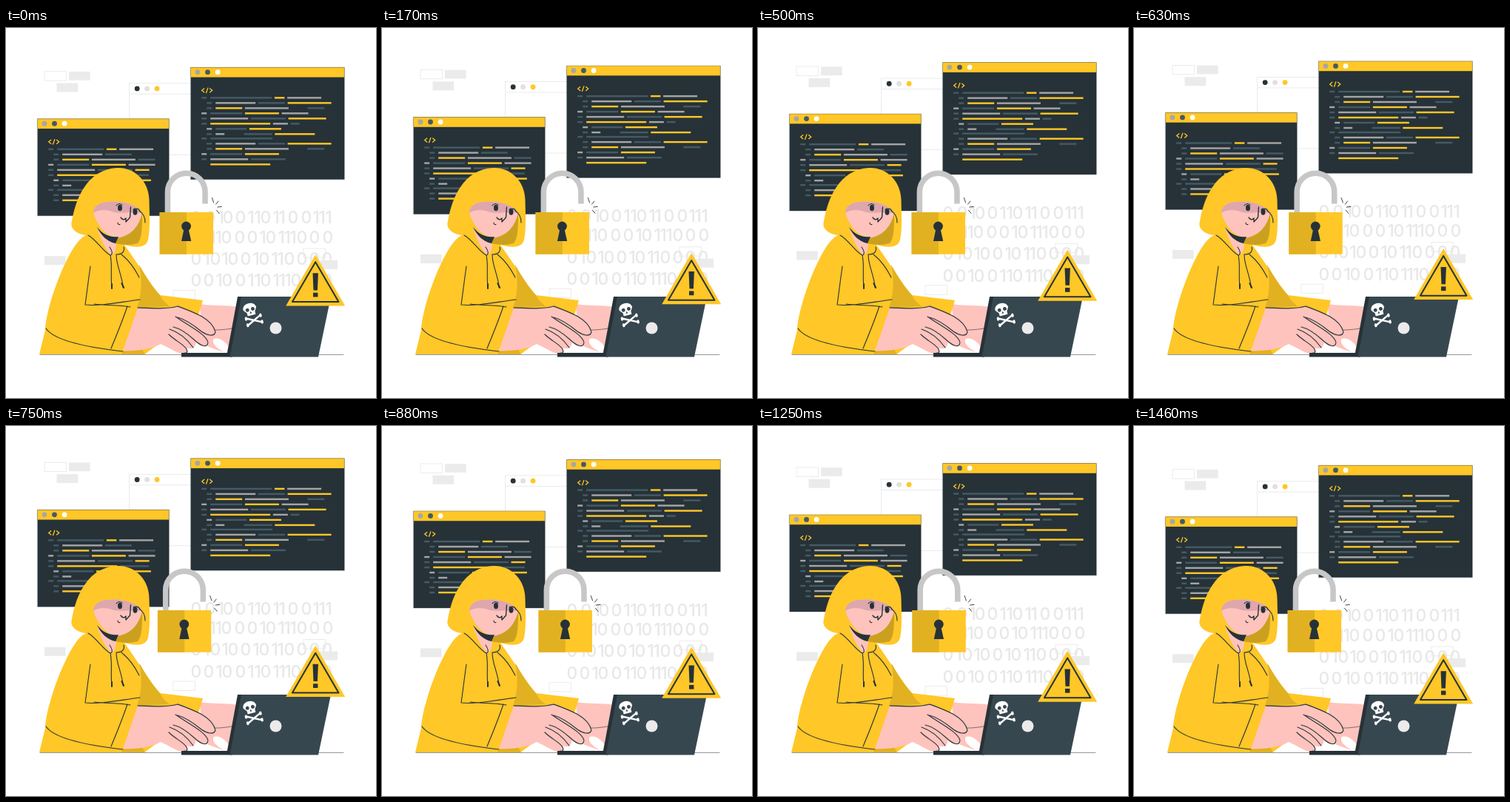
Animation, 500 px wide and 500 px high, one loop 1500 ms. Source, as an HTML page:

```html
<!DOCTYPE html>
<html lang="en">
<head>
<meta charset="utf-8">
<title>Open lock</title>
<style>
  html, body { margin: 0; width: 100%; height: 100%; overflow: hidden; background: #fff; }
  svg { display: block; width: 100%; height: 100%; stroke-width: 1.1; }
  .y { fill: #ffc727; }
  .shade { fill: #e2b122; }
  .inner { fill: #cca01f; }
  .dark { fill: #263238; }
  .skin { fill: #ffc3bd; }
  .pale { fill: #ebebeb; }
  .frame { fill: #fff; stroke: #e6e6e6; stroke-width: .8; }
  .ink { fill: none; stroke: #263238; stroke-linecap: round; stroke-linejoin: round; }
  .bits { font: 500 23px Inter, sans-serif; text-anchor: middle; fill: #e8e8e8; }
</style>
</head>
<body>
<svg viewBox="0 0 500 500">
  <g class="float">
    <g class="frame">
      <rect x="52" y="59" width="29.5" height="12.3"/>
      <rect x="226" y="354.8" width="29.5" height="12.3"/>
      <rect x="402" y="298.3" width="29.5" height="12.3"/>
    </g>
    <g class="bits" id="bits"></g>
    <g class="pale">
      <rect x="85" y="59.2" width="28.7" height="11.7"/>
      <rect x="68.5" y="74.8" width="28.7" height="12"/>
      <rect x="52" y="308.5" width="28.7" height="12"/>
      <rect x="419" y="314.2" width="29" height="12"/>
    </g>
    <g class="frame">
      <rect x="166.5" y="75" width="207" height="96.5"/>
      <path d="M166.5 89.5H373"/>
    </g>
    <circle class="dark" cx="177.2" cy="82.2" r="3.4"/>
    <circle cx="190.6" cy="82.2" r="3.4" fill="#e0e0e0"/>
    <circle class="y" cx="204.1" cy="82.2" r="3.4"/>
    <g id="windows"></g>
  </g>

  <g id="lock">
    <path d="M218.6 250V221.5a25.3 25.3 0 0 1 50.6 0V237.5" fill="none" stroke="#c7c7c7" stroke-width="7.5"/>
    <rect class="y" x="207.8" y="249" width="72.4" height="56.7"/>
    <rect class="shade" x="207.8" y="249" width="36.3" height="56.7"/>
    <circle class="dark" cx="243.7" cy="268" r="6.4"/>
    <path class="dark" d="M241 270h5.4l4 18h-13.2z"/>
    <path class="ink" d="M280.8 236L278.6 229.5M283.8 238.2L287 234M286 242L291.5 241.4M284.6 246.2L288.2 250.4" stroke-width=".9"/>
  </g>

  <path class="ink" d="M46 441.5H456" stroke-width=".5"/>

  <!-- far hand -->
  <path class="skin" d="M262 373C280 376 297 374 313 377L301 440C290 437 276 432 268 428L264 405Z"/>
  <path class="ink" d="M272 407C282 409 293 408 305 406" stroke-width=".6"/>
  <path fill="#fff" d="M280 421C286 416 298 425 300 430L298 440C292 437 282 431 280 425Z"/>

  <!-- hoodie -->
  <path class="y" d="M45 441L53 408C56 368 84 300 101 285C108 278 118 278 125 280L160 293C178 318 194 345 208 361L266 368L260 388L187 441Z"/>
  <path class="shade" d="M180 320C190 338 199 351 208 361C211 367 215 372 221 376L177 379C184 357 184 340 180 320Z"/>
  <path class="shade" d="M158 437L184 434L188 441H156Z"/>

  <!-- neck -->
  <path class="skin" d="M122 270L150 288L147 303L142 307C135 298 127 285 122 270Z"/>

  <!-- near hand -->
  <path class="skin" d="M178 378C195 378 215 380 232 376C250 382 278 393 283 411C281 417 274 417 269 413C273 419 276 426 271 430C266 432 260 427 256 423C258 430 252 436 245 432L243 440C232 442 222 432 209 427C198 433 181 437 158 436Z"/>
  <g class="ink">
    <path d="M178 378C200 379 217 380 232 376C254 384 279 393 283 411C281 418 271 415 264 410C253 401 243 394 232 391"/>
    <path d="M229 390C246 402 271 414 273 425C272 434 261 428 254 421C244 412 235 406 226 404"/>
    <path d="M220 414C229 423 240 427 244 434C246 438 244 440 241 439M221 407C236 412 246 422 253 432"/>
    <path d="M54 406C64 421 105 431 158 437"/>
    <path d="M164 376C157 397 149 416 142 433"/>
    <path d="M114 322C111 343 109 360 107 374C128 376 150 371 181 367M119 373C137 375 153 374 168 377"/>
  </g>

  <!-- hood and face -->
  <path class="y" d="M150 189C174 188 193 207 193.5 232C194 252 195 273 192 286C189 298 175 297 160 293L147 291C130 288 121 277 110 280C100 280 85 273 89 261C94 232 109 191 150 189Z"/>
  <path class="skin" d="M123 270L149 290L146 303L141 306C134 298 128 285 123 270Z"/>
  <path class="inner" d="M184 249C184 268 184 284 178 291C168 294 157 293 147 291C149 279 167 270 184 249Z"/>
  <path class="skin" d="M118 250C118 241 126 235 139 235C158 233 177 239 184 250C180 268 169 281 150 284C136 282 124 268 118 250Z"/>
  <path d="M118 250C118 241 126 235 139 235C158 233 177 239 184 250C168 248 155 251 146 249C137 246 128 244 118 250Z" fill="#dda7ad"/>
  <path class="dark" d="M123 269C132 280 141 283 152 282L148 291C137 289 128 280 123 269Z"/>
  <ellipse class="dark" cx="154" cy="243" rx="3" ry="4.3"/>
  <ellipse class="dark" cx="174.5" cy="248.5" rx="3" ry="4.2"/>
  <g class="ink">
    <path d="M149 240C151 237 154 237 157 239M172 245C175 243 179 244 181 247"/>
    <path d="M168.5 242L167.5 256L162 262L162 257C160 260 157 259 155 256" stroke-width="1.4"/>
    <path d="M151 263C151 265 152 266 154 265.5M180 247C185 250 188 256 188 263"/>
    <path d="M111 280C122 286 132 303 141 307C145 306 143 300 140 296M141 307C144 322 141 334 143 350M149 306C157 306 161 302 159 296M149 306C149 322 157 334 158 350"/>
    <path d="M156 306C166 314 174 325 180 337"/>
    <path d="M143 346V352M156.5 345L159 351" stroke-width="2"/>
  </g>

  <!-- laptop -->
  <path class="dark" d="M237 439H299L313 363H320L306 444.5H237Z"/>
  <path d="M318 363H439L422 444.5H302.5Z" fill="#37474f"/>
  <circle class="pale" cx="364.5" cy="405.5" r="8"/>
  <g transform="translate(1 -1) rotate(-14 331 387)">
    <path d="M321 380C321 370 339 370 339 380L336 385V389H325V385Z" fill="#fff"/>
    <path d="M323 392L341 401M323 401L341 392" stroke="#fff" stroke-width="2.4"/>
    <path d="M322 391v2M342 391v2M322 400v2M342 400v2" stroke="#fff" stroke-width="3.2" stroke-linecap="round"/>
    <circle cx="326.5" cy="381" r="2.4" fill="#37474f"/>
    <circle cx="334" cy="381" r="2.4" fill="#37474f"/>
    <path d="M330.2 383.5l1.5 2.8h-3z" fill="#37474f"/>
  </g>

  <!-- warning sign -->
  <g class="float">
    <path class="y" d="M418.2 306.5L458.2 375.7H378.2Z"/>
    <path class="ink" d="M418.2 316.5L449.5 370.3H386.9Z" stroke-width="2"/>
    <path class="dark" d="M414.5 331.5H421.9L420.9 354.8H415.5Z"/>
    <rect class="dark" x="415" y="358" width="6.4" height="5.7"/>
  </g>
</svg>

<script>
const LOOP = 1500, STEP = LOOP / 36;
const COLORS = { d: '#455a64', g: '#a6a6a6', y: '#ffc727' };

const bar = (x, y, w, color) =>
  `<rect x="${x}" y="${y - 1.2}" width="${w}" height="2.4" fill="${color}"/>`;

// A row is: gutter colour + indent level, then coloured widths ("_" is a blank).
function codeRow(row, x, y) {
  const [gutter, ...parts] = row.split(' ');
  x += gutter[1] * 7;
  let out = gutter[0] === '_' ? '' : bar(x, y, 7, COLORS[gutter[0]]);
  x += 12;
  for (const part of parts) {
    const width = +part.slice(1);
    if (part[0] !== '_') out += bar(x, y, width, COLORS[part[0]]);
    x += width + 3.7;
  }
  return out;
}

function codeWindow(x, y, w, h, rows) {
  const dots = ['#a6a6a6', '#455a64', '#fff'].map((c, i) =>
    `<circle cx="${x + 9.2 + i * 13.6}" cy="${y + 6.5}" r="3.4" fill="${c}"/>`).join('');
  // The second block of rows, after eight, sits slightly closer.
  const rowY = i => y + 41.1 + i * 7 - (i > 7 ? 1 : 0);
  return `<rect class="dark" x="${x}" y="${y}" width="${w}" height="${h}"/>
    <rect class="y" x="${x}" y="${y}" width="${w}" height="13.3"/>
    <path class="ink" d="M${x} ${y}h${w}v${h}h${-w}z" stroke-width=".3"/>${dots}
    <path d="M${x + 18.5} ${y + 28.2}l-3.5 2.9 3.5 2.9m2.2 .8l2.6-7.4m2.2 .8l3.5 2.9-3.5 2.9"
      fill="none" stroke="#ffc727" stroke-width="1.3"/>
    ${rows.map((row, i) => codeRow(row, x + 14.5, rowY(i))).join('')}`;
}

document.getElementById('windows').innerHTML =
  codeWindow(249.7, 53.5, 207.6, 151.4, [
    'd0 d83 y13.5 g46', 'd1 g54 d36 y59', 'd1 y36 g59 _18 d23', 'g0 d43 y46 g36',
    'd0 g51 d47 y51', 'd0 y81 g20 d12', 'g1 d42 y43', 'd1 g12 _19 d38 y54', 'd0 d84',
    'd1 g54 d36 y59', 'd1 y36 g59 _18 d23', 'g0 d43 y46', 'd0 g51 d47', '_0 y81'
  ]) +
  codeWindow(42.7, 123, 177.6, 131, [
    'd0 d63 y13.5 g46', 'd1 g54 d36', 'd1 y36 g59 d23', 'g0 d43 y46 g36',
    'd0 g51 d47 y19', 'd0 y81 d39', 'g1 d42 y74', 'd1 g12 _19 d38', 'd0 d84',
    'd1 g54', 'd1 y36'
  ]);

const BITS = [
  ['001001101100111', 264.6, [257, 276, 290, 300, 317, 331, 340, 351, 365, 373, 388, 406, 419, 427, 436]],
  ['01100010111000', 290.8, [257, 279, 287, 298, 316, 333, 347, 358, 372, 380, 388, 400, 417, 435]],
  ['01010010110000', 320, [257, 271, 283, 296, 307, 324, 338, 349, 363, 371, 383, 400, 417, 434]],
  ['00100110111000', 349.7, [257, 274, 288, 299, 317, 331, 340, 351, 365, 373, 381, 392, 409, 434]]
];
document.getElementById('bits').innerHTML = BITS.map(([text, y, xs]) =>
  `<text x="${xs.join(' ')}" y="${y}">${text}</text>`).join('');

// Sideways shake, one stop per tenth of the loop.
const SHAKE = [0, -1, 2, -4, 4, -4, 4, -4, 2, -1, 0];
const floats = document.querySelectorAll('.float');
const lock = document.getElementById('lock');

function draw() {
  const tick = Math.floor((performance.now() % LOOP + 5) / STEP) % 36;
  const p = (tick + .5) / 36;
  const lift = 10 * (1 - Math.abs(2 * p - 1));
  const i = Math.floor(p * 10);
  const shift = SHAKE[i] + (SHAKE[i + 1] - SHAKE[i]) * (p * 10 - i);
  floats.forEach(g => g.setAttribute('transform', `translate(0 ${-lift})`));
  lock.setAttribute('transform', `translate(${shift} 0)`);
  requestAnimationFrame(draw);
}
draw();
</script>
</body>
</html>
```
